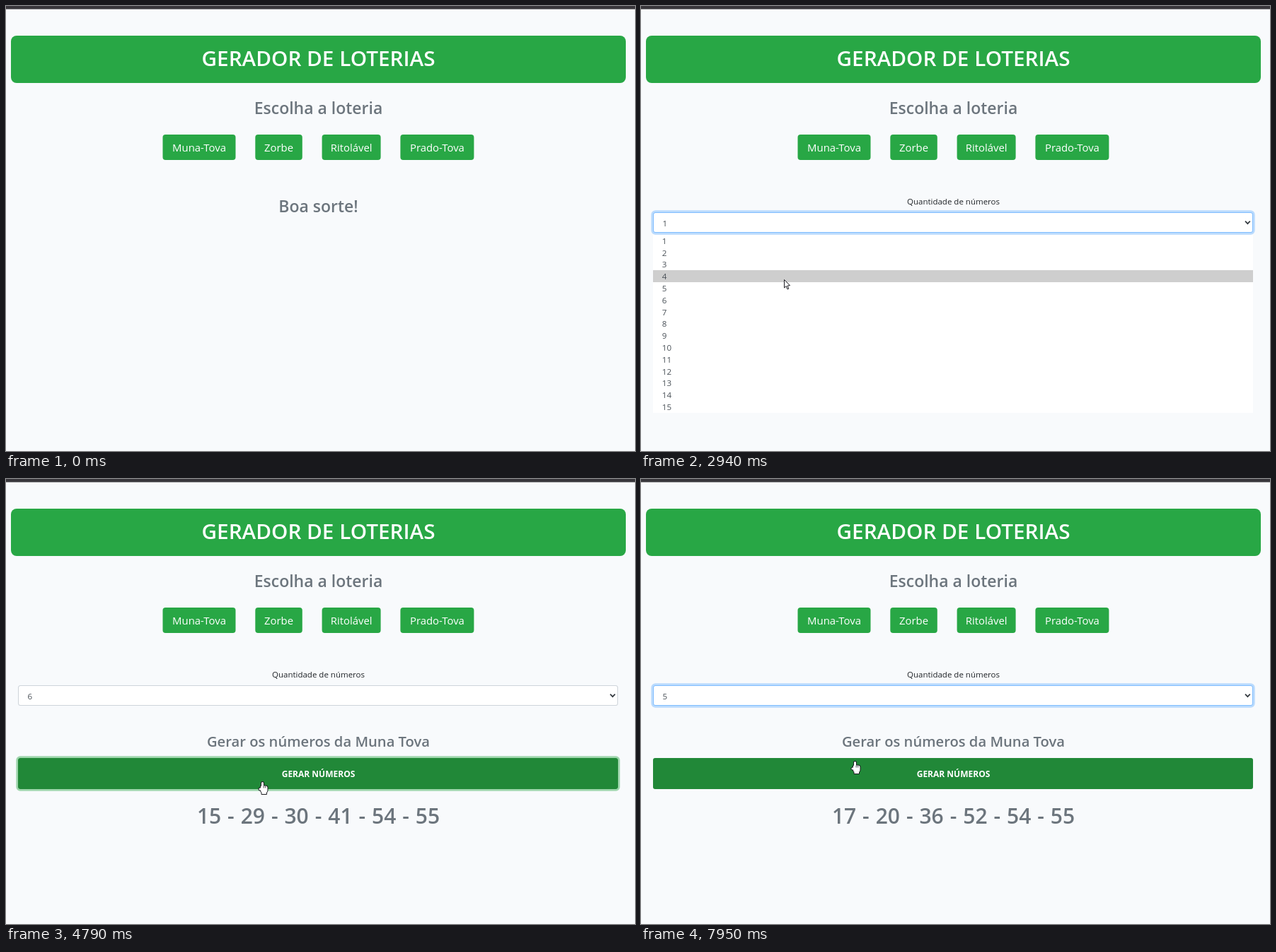
An HTML page with a canvas for the animation above (8000 ms loop, 889 by 630 pixels).

```html
<!DOCTYPE html>
<html lang="pt-BR">
<head>
<meta charset="utf-8">
<title>Gerador de loterias</title>
<style>
html, body { margin: 0; width: 100%; height: 100%; overflow: hidden; background: #f8fafc; }
canvas { display: block; width: 889px; height: 630px; }
</style>
</head>
<body>
<canvas id="stage" width="889" height="630"></canvas>
<script>
const ctx = document.getElementById('stage').getContext('2d');
const LOOP = 8000, STEP = 78, MID = 441.5;
const LEFT = 17, WIDTH = 848;
const LIST_TOP = 324, ROW = 16.8, ROWS = 15;
const PAGE = '#f8fafc', GREEN = '#28a745', DARK = '#218838', ACTIVE = '#1e7e34';
const GREY = '#6c757d', FIELD = '#495057';
const GREEN_GLOW = 'rgba(72,180,97,.5)', BLUE_GLOW = 'rgba(0,123,255,.25)';
const FAMILY = '"Open Sans", "Noto Sans", sans-serif';

const tabs = [['Muna-Tova', 103], ['Zorbe', 66.5], ['Ritolável', 83], ['Prado-Tova', 104]];
const TAB = { x: 221.5, y: 182, h: 36, gap: 27.8 };

// Pointer moves: start time, duration, destination.
const ENTRY = { x: 752, y: 607 };
const moves = [
  [200, 770, 361, 285],
  [970, 385, 287, 202],    // first tab
  [1990, 70, 291, 224],
  [2070, 310, 365, 303],   // select box
  [2780, 150, 202, 387],   // down the list and back
  [2940, 310, 160, 499],
  [3260, 230, 143, 419],
  [3940, 540, 362, 429],   // generate
  [5870, 310, 336, 304],   // select box
  [6440, 385, 127, 390],
  [6830, 150, 122, 405],
  [7540, 385, 302, 400]    // generate
];

function pointerAt(t) {
  let { x, y } = ENTRY;
  for (const [start, length, toX, toY] of moves) {
    if (t < start) break;
    const u = Math.min(1, Math.floor((t - start) / STEP + 0.1) * STEP / length);
    x += (toX - x) * u;
    y += (toY - y) * u;
  }
  return { x, y };
}

function text(str, x, y, size, weight, color, align = 'center', gap = 0) {
  ctx.font = `${weight} ${size}px ${FAMILY}`;
  ctx.wordSpacing = gap + 'px';
  ctx.textAlign = align;
  ctx.fillStyle = color;
  ctx.fillText(str, x, y);
}

function box(x, y, w, h, r, fill, glow) {
  ctx.beginPath();
  ctx.roundRect(x, y, w, h, r);
  ctx.fillStyle = fill;
  ctx.fill();
  if (!glow) return;
  const d = 2.7;
  ctx.beginPath();
  ctx.roundRect(x - d / 2, y - d / 2, w + d, h + d, r + d / 2);
  ctx.strokeStyle = glow;
  ctx.lineWidth = d;
  ctx.stroke();
}

function drawHeader(hover, focus) {
  box(0, 0, 889, 4.5, 0, '#38363b');
  box(7, 42, 869, 67, 8, GREEN);
  text('GERADOR DE LOTERIAS', MID, 85, 29.7, 600, '#fff');
  text('Escolha a loteria', MID, 153, 23, 600, GREY);
  let x = TAB.x;
  tabs.forEach(([label, w], i) => {
    const first = i === 0;
    box(x, TAB.y, w, TAB.h, 4, first && hover ? DARK : GREEN, first && focus && GREEN_GLOW);
    text(label, x + w / 2, 206, 14.9, 400, '#fff');
    x += w + TAB.gap;
  });
}

function drawSelect(value, focus) {
  text('Quantidade de números', MID, 281, 11.5, 400, '#212529');
  box(LEFT, 292, WIDTH, 29, 3.5, focus ? '#80bdff' : '#ced4da', focus && BLUE_GLOW);
  box(LEFT + 1, 293, WIDTH - 2, 27, 2.5, '#fff');
  text(value, 30.5, 311.5, 11.6, 400, FIELD, 'left');
  ctx.beginPath();
  ctx.moveTo(854, 304.7);
  ctx.lineTo(857.4, 308.2);
  ctx.lineTo(860.8, 304.7);
  ctx.strokeStyle = '#343a40';
  ctx.lineWidth = 1.7;
  ctx.stroke();
}

function drawGenerator(fill, focus, numbers) {
  text('Gerar os números da Muna Tova', MID, 379, 20.2, 600, GREY);
  box(LEFT, 395, WIDTH, 44, 3, fill, focus && GREEN_GLOW);
  text('GERAR NÚMEROS', MID, 421.5, 12, 700, '#fff');
  text(numbers.join(' - '), MID, 488, 30, 600, GREY, 'center', 1.15);
}

function drawList(current) {
  box(LEFT, LIST_TOP, WIDTH, ROW * ROWS, 0, '#fff');
  box(LEFT, Math.round(LIST_TOP + current * ROW), WIDTH, 17, 0, '#cecece');
  for (let i = 0; i < ROWS; i++) {
    text(String(i + 1), 29.8, 336.8 + i * ROW, 11.6, 400, FIELD, 'left');
  }
}

function drawHand() {
  const shape = new Path2D();
  shape.roundRect(-1.5, -0.5, 3, 12, 1.5);      // index finger
  shape.roundRect(-5, 8, 5, 3, 1.5);            // thumb
  shape.roundRect(-2.5, 5, 9.5, 10, [1, 2.5, 4, 4]);
  shape.rect(-1, 13, 6.5, 3.5);
  ctx.lineWidth = 2;
  ctx.stroke(shape);
  ctx.fill(shape);
  ctx.lineWidth = 0.8;
  ctx.beginPath();
  for (const x of [1.7, 4.2]) {
    ctx.moveTo(x, 5);
    ctx.lineTo(x, 8);
  }
  ctx.stroke();
}

function drawArrow() {
  const shape = new Path2D('M0 0V11.5L2.7 9L4.5 13.5L6.3 12.7L4.5 8.5L8 8.2Z');
  ctx.fill(shape);
  ctx.lineWidth = 1;
  ctx.stroke(shape);
}

function drawPointer({ x, y }, hand) {
  ctx.save();
  ctx.translate(Math.round(x) + 0.5, Math.round(y) + 0.5);
  ctx.fillStyle = '#fff';
  ctx.strokeStyle = '#1c1c22';
  ctx.lineJoin = 'round';
  (hand ? drawHand : drawArrow)();
  ctx.restore();
}

function render(t) {
  const during = (a, b) => t >= a && t < b;
  const p = pointerAt(t);
  const shown = t >= 1530;
  const open = during(2620, 3940) || during(6430, 7620);
  const value = t >= 7620 ? 5 : t >= 3940 ? 6 : 1;
  const overTab = p.x > TAB.x && p.x < TAB.x + tabs[0][1] && p.y > TAB.y && p.y < TAB.y + TAB.h;
  const overRun = shown && !open && p.y >= 395 && p.y <= 439;
  const pressed = during(4710, 4790) || during(5570, 5630);

  ctx.fillStyle = PAGE;
  ctx.fillRect(0, 0, 889, 630);
  drawHeader(overTab && t < 1610, during(1450, 1610));

  if (!shown) {
    text('Boa sorte!', MID, 292, 23, 600, GREY);
  } else {
    const numbers = t >= 5630 ? [17, 20, 36, 52, 54, 55]
      : t >= 4790 ? [15, 29, 30, 41, 54, 55] : [];
    drawSelect(String(value), during(2540, 4710) || t >= 6360);
    drawGenerator(pressed ? ACTIVE : overRun ? DARK : GREEN, during(4710, 6360), numbers);
    if (open) drawList(p.y >= LIST_TOP ? Math.floor((p.y - LIST_TOP) / ROW) : value - 1);
  }
  if (t >= 200) drawPointer(p, overTab || overRun);
}

const began = performance.now();
function tick() {
  render((performance.now() - began) % LOOP);
  requestAnimationFrame(tick);
}
tick();
</script>
</body>
</html>
```
